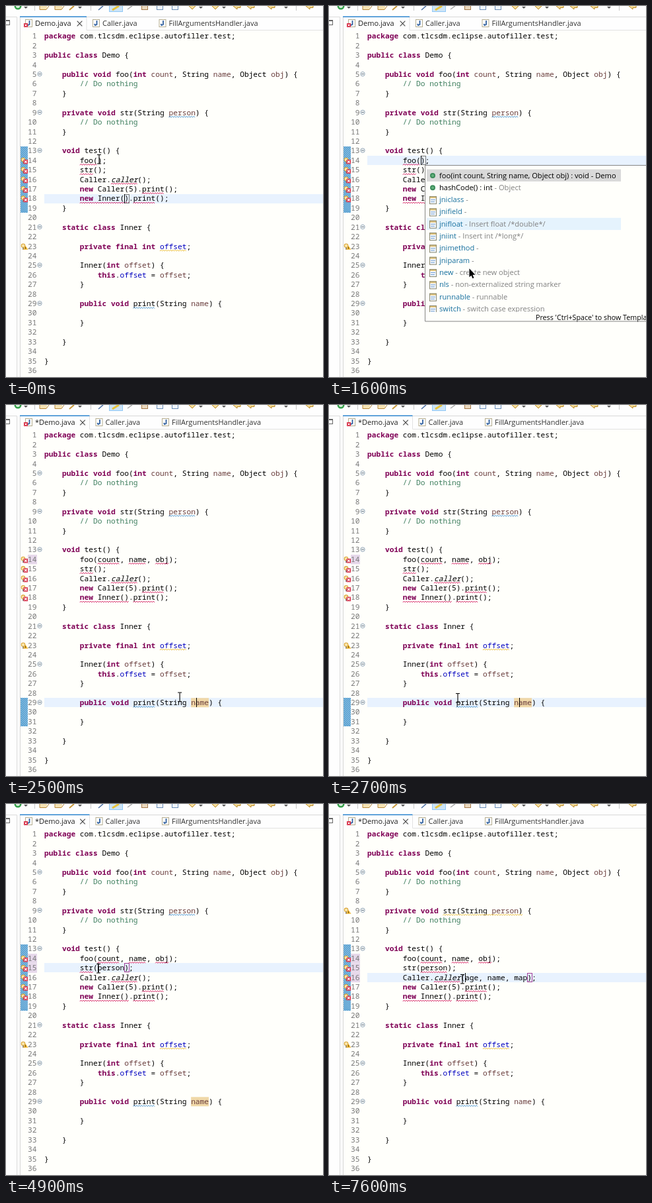
These frames come from a looping animation (480 px wide and 560 px high, 8 s). An HTML page with a canvas:

```html
<!DOCTYPE html>
<html lang="en">
<head>
<meta charset="utf-8">
<title>Argument completion in a Java editor</title>
<style>
html, body { margin: 0; width: 480px; height: 560px; overflow: hidden; background: #fff; }
canvas { display: block; width: 480px; height: 560px; }
</style>
</head>
<body>
<canvas id="stage" width="480" height="560"></canvas>
<script>
const ctx = document.getElementById('stage').getContext('2d');
const LOOP = 8000, STEP = 100;
const MONO = '11.23px "Noto Sans Mono", "DejaVu Sans Mono", monospace';
const UI = '11px "Open Sans", "Noto Sans", sans-serif';
const LIST = '11.1px "Open Sans", "Noto Sans", sans-serif';
const HINT = '10.7px "Open Sans", "Noto Sans", sans-serif';
const PAPER = '#fffffb';
const LEFT = 58, LINE = 14.42, ROW = 18.32;
const RED = '#d4145a', BLUE = '#3f8fd0', YELLOW = '#e8b830';

// Moments when the state of the editor changes.
const AT = {
  clickFoo: 200, open: 900, point: 1200, fillFoo: 2400, clickStr: 3900, fillStr: 4900,
  recheck: 5400, clickCaller: 6300, unmark: 6400, fillCaller: 7600
};

// Pointer path: time, x, y.
const PATH = [
  [0, 141, 231], [1200, 141, 231], [1650, 215, 402], [1900, 215, 402],
  [2000, 215, 419], [2100, 216, 419], [2300, 287, 440], [2400, 287, 440],
  [2700, 195, 442], [2800, 195, 442], [3700, 140, 248], [5600, 140, 248],
  [6100, 206, 264], [6800, 206, 264], [6900, 202, 264], [LOOP, 202, 264]
];

const ROWS = [
  ['foo(int count, String name, Object obj) : void - Demo', ''],
  ['hashCode() : int', ' - Object'],
  ['jniclass', ' - '], ['jnifield', ' - '],
  ['jnifloat', ' - Insert float /*double*/'],
  ['jniint', ' - Insert int /*long*/'],
  ['jnimethod', ' - '], ['jniparam', ' - '],
  ['new', ' - create new object'],
  ['nls', ' - non-externalized string marker'],
  ['runnable', ' - runnable'],
  ['switch', ' - switch case expression'],
  ['switch', ' - switch labeled expression'],
  ['toarray', ' - convert collection to array'],
  ['Fill method arguments: count, name, obj', '']
];

// % marks a parameter, $ a field, ~ a static call.
const codeAt = t => `package com.tlcsdm.eclipse.autofiller.test;

public class Demo {

    public void foo(int %count, String %name, Object %obj) {
        // Do nothing
    }

    private void str(String %person) {
        // Do nothing
    }

    void test() {
        foo(${t >= AT.fillFoo ? 'count, name, obj' : ''});
        str(${t >= AT.fillStr ? 'person' : ''});
        Caller.~caller(${t >= AT.fillCaller ? 'age, name, map' : ''});
        new Caller(5).print();
        new Inner().print();
    }

    static class Inner {

        private final int $offset;

        Inner(int %offset) {
            this.$offset = %offset;
        }

        public void print(String %name) {

        }

    }

}
`.split('\n');

const TOKEN = /(\/\/.*)|([%$~])(\w+)|\b(package|public|private|class|void|int|new|static|final|this)\b|\w+|[^\w\s%$~]+|\s+/g;
const MARK_COLOR = { '%': '#6a3e3e', '$': '#0000c0', '~': '#000' };

ctx.font = MONO;
const CHAR = ctx.measureText('0').width;
const col = n => LEFT + n * CHAR;
const mid = line => 45.5 + (line - 1) * LINE;
const base = line => mid(line) + 3.8;

function box(x, y, w, h, color) {
  ctx.fillStyle = color;
  ctx.fillRect(x, y, w, h);
}

function frame(x, y, w, h, color) {
  ctx.strokeStyle = color;
  ctx.lineWidth = 1;
  ctx.strokeRect(x + .5, y + .5, w - 1, h - 1);
}

function stroke(color, width, ...pts) {
  ctx.strokeStyle = color;
  ctx.lineWidth = width;
  ctx.beginPath();
  pts.forEach(([x, y]) => ctx.lineTo(x, y));
  ctx.stroke();
}

function shape(color, ...pts) {
  ctx.fillStyle = color;
  ctx.beginPath();
  pts.forEach(([x, y]) => ctx.lineTo(x, y));
  ctx.fill();
}

function dot(x, y, r, color) {
  ctx.fillStyle = color;
  ctx.beginPath();
  ctx.arc(x, y, r, 0, 7);
  ctx.fill();
}

function text(s, x, y, font, color, align = 'left') {
  ctx.font = font;
  ctx.fillStyle = color;
  ctx.textAlign = align;
  ctx.fillText(s, x, y);
}

function cross(x, y, r, color, width = 1) {
  stroke(color, width, [x - r, y - r], [x + r, y + r]);
  stroke(color, width, [x + r, y - r], [x - r, y + r]);
}

function pointer(t) {
  const i = Math.max(1, PATH.findIndex(p => p[0] >= t));
  const [t0, x0, y0] = PATH[i - 1], [t1, x1, y1] = PATH[i];
  const k = Math.min(1, Math.max(0, (t - t0) / (t1 - t0)));
  const e = k * k * (3 - 2 * k);
  return [x0 + (x1 - x0) * e, y0 + (y1 - y0) * e];
}

function squiggle(line, from, count, color) {
  const y = base(line) + 2.6, end = col(from + count), pts = [];
  for (let x = col(from), i = 0; x <= end; x += 1.8, i++) pts.push([x, y + (i % 2 ? -.9 : .9)]);
  stroke(color, 1, ...pts);
}

function toolbar() {
  dot(18, 0, 5.5, '#35a04a');
  dot(18, 0, 3, '#d9f0dc');
  shape('#555', [27, 1], [33, 1], [30, 4]);
  stroke('#c8c8c8', 1, [43.5, 0], [43.5, 7]);
  for (const x of [51, 74]) {
    box(x, 0, 11, 5, '#f6e3b4');
    stroke('#b8893c', 1, [x, 0], [x, 5.5], [x + 10, 5.5], [x + 14, 0]);
  }
  stroke('#c99a3c', 2, [96, 6], [103, 0]);
  shape('#555', [109, 1], [115, 1], [112, 4]);
  stroke('#c8c8c8', 1, [128.5, 0], [128.5, 7]);
  stroke('#4a6fa5', 1.5, [140, 6], [147, 0]);
  box(156, 0, 21, 9, '#cce4f7');
  frame(156, -3, 21, 12, '#90c8f6');
  stroke('#e8c33c', 3, [161, 6], [171, 0]);
  stroke('#aaa', 1.5, [184, 5], [191, 0]);
  box(205, 0, 9, 6, '#ead8be');
  frame(205, -3, 10, 9, '#a67b4c');
  for (const x of [228, 251]) {
    box(x, 0, 9, 6, '#f1f6fc');
    frame(x, -3, 10, 9, '#6d8fb8');
  }
  for (const x of [282, 317]) {
    shape('#f6dd9a', [x - 5, 0], [x + 5, 0], [x, 5]);
    stroke('#b88720', 1, [x - 5, 0], [x, 5], [x + 5, 0]);
    shape('#555', [x + 10, 1], [x + 16, 1], [x + 13, 4]);
  }
  for (const x of [350, 371, 402, 460]) {
    shape('#f6dd9a', [x - 6, 0], [x + 5, -3], [x + 5, 2], [x, 2], [x, 5]);
    stroke('#b88720', 1, [x - 6, 0], [x, 5], [x, 2.5], [x + 5, 2.5], [x + 5, 0]);
  }
  shape('#555', [421, 1], [427, 1], [424, 4]);
  stroke('#c8c8c8', 1, [439.5, 0], [439.5, 7]);
}

function fileIcon(x, failed) {
  box(x, 20, 11, 12, '#fff');
  frame(x, 20, 11, 12, '#b5ad90');
  stroke('#2f5f9e', 1.8, [x + 6.5, 22], [x + 6.5, 28], [x + 4, 29], [x + 3, 27]);
  if (failed) {
    box(x - 2, 26, 6, 6, '#d8324a');
    cross(x + 1, 29, 1.5, '#fff');
  }
}

function tabs(dirty) {
  const shift = dirty ? 4.5 : 0, edge = 122 + shift;
  stroke('#dcdcdc', 1, [0, 16.5], [16.5, 16.5], [16.5, 560]);
  stroke('#d8d8d8', 1, [480, 16.5], [21.5, 16.5], [21.5, 560]);
  stroke('#e2e2e2', 1, [edge, 17], [edge, 36.5], [480, 36.5]);
  box(17, 17, 4, 543, '#fafafa');
  box(21, 15.5, edge - 21, 1.5, '#2f86d0');
  frame(-2, 21, 8, 8, '#666');
  box(0, 21, 5, 2, '#666');

  fileIcon(29, true);
  text((dirty ? '*' : '') + 'Demo.java', 44, 30, UI, '#222');
  cross(111.5 + shift, 26.5, 3.8, '#444', 1.1);
  fileIcon(131 + shift, false);
  text('Caller.java', 146 + shift, 30, UI, '#333');
  fileIcon(231.5 + shift, false);
  text('FillArgumentsHandler.java', 246.5 + shift, 30, UI, '#333');
}

function bulb(y) {
  dot(26, y - 1, 3.3, '#d9a53a');
  dot(26, y - 1, 2.2, '#fbe7ac');
  box(25, y + 2, 3, 3, '#8a8a8a');
}

function errorIcon(line) {
  const y = mid(line);
  bulb(y);
  box(26.5, y - 1, 6.5, 6.5, '#d62f48');
  cross(29.8, y + 2.2, 1.8, '#fff', 1.2);
}

function warningIcon(line) {
  const y = mid(line);
  bulb(y);
  shape('#f0b93a', [29.5, y - 1], [33.5, y + 5], [25.5, y + 5]);
  stroke('#6b4a00', 1, [29.5, y + 1], [29.5, y + 4]);
}

function range(first, last) {
  const top = Math.round(mid(first) - 7), bottom = Math.round(mid(last) + 7);
  box(22, top, 11, bottom - top, '#a9d3ee');
  ctx.save();
  ctx.beginPath();
  ctx.rect(22, top, 11, bottom - top);
  ctx.clip();
  for (let y = top - 12; y < bottom; y += 3) stroke('#3b8cc4', 1.2, [22, y], [34, y + 12]);
  ctx.restore();
}

function ruler(t) {
  if (t >= AT.fillFoo && t < AT.clickStr) range(29, 31);
  else range(13, 19);

  const changed = [[14, AT.fillFoo], [15, AT.fillStr], [16, AT.fillCaller]];
  for (const [line, since] of changed)
    if (t >= since) box(33, mid(line) - 7, 14, LINE, '#e6d8ea');

  for (let line = 14; line <= 18; line++) errorIcon(line);
  warningIcon(23);
  if (t >= AT.recheck) warningIcon(9);
  for (let line = 1; line <= 36; line++) text(line, 46.5, base(line), MONO, '#787878', 'right');
  for (const line of [5, 9, 13, 21, 25, 29]) {
    const y = mid(line) - .5;
    ctx.strokeStyle = '#8fa3b5';
    ctx.lineWidth = 1;
    ctx.beginPath();
    ctx.arc(51, y, 3.2, 0, 7);
    ctx.stroke();
    stroke('#55697c', 1, [49, y], [53, y]);
  }
}

function code(t) {
  codeAt(t).forEach((line, i) => {
    let n = 0;
    for (const [all, comment, mark, word, keyword] of line.matchAll(TOKEN)) {
      const s = word || all;
      const style = keyword ? 'bold ' : mark === '~' ? 'italic ' : '';
      const color = comment ? '#3f7f5f' : keyword ? '#7f0055' : mark ? MARK_COLOR[mark] : '#000';
      if (s.trim()) text(s, col(n), base(i + 1), style + MONO, color);
      n += s.length;
    }
  });
}

function problems(t) {
  if (t < AT.fillFoo) squiggle(14, 8, 4, RED);
  else for (const [from, count] of [[12, 5], [19, 4], [25, 3]]) squiggle(14, from, count, RED);
  if (t < AT.recheck) {
    squiggle(15, 8, 3, RED);
    squiggle(9, 28, 6, BLUE);
  } else {
    squiggle(15, 12, 6, RED);
    squiggle(9, 17, 18, YELLOW);
  }
  squiggle(16, 15, 6, RED);
  squiggle(17, 22, 5, RED);
  squiggle(18, 8, 11, RED);
  squiggle(18, 20, 5, RED);
  squiggle(23, 26, 6, YELLOW);
  squiggle(29, 20, 5, BLUE);
}

// Caret line and column, plus the column of the boxed bracket.
function caretAt(t) {
  if (t >= AT.fillCaller) return [16, 22, 36];
  if (t >= AT.clickCaller) return [16, 22, 22];
  if (t >= AT.fillStr) return [15, 12, 18];
  if (t >= AT.clickStr) return [15, 12, 12];
  if (t >= AT.fillFoo) return [29, 34.1, -1];
  if (t >= AT.clickFoo) return [14, 12, 12];
  return [18, 18, 18];
}

function popup(t) {
  const scroll = t >= 1800 ? 4 : t >= 1700 ? 3 : 0;
  const [mx, my] = pointer(t - 150);
  const hover = mx > 146 && my > 247 ? Math.floor((my - 246.3) / ROW) + scroll : -1;
  box(145, 240, 335, 236, PAPER);
  ctx.save();
  ctx.beginPath();
  ctx.rect(146, 246, 334, 216);
  ctx.clip();
  ROWS.forEach(([name, note], i) => {
    const y = 255.5 + (i - scroll) * ROW;
    if (i === 0) box(148, y - 9, 294, ROW, '#d9d9d9');
    else if (i === hover) box(148, y - 9, 294, ROW, '#e5f3fd');
    if (i < 2) {
      dot(157, y + .5, 4, '#3c8c5a');
      dot(157, y + .5, 2, '#65b47f');
    } else if (i < 14) {
      box(152, y - 5, 11, 12, '#f5f8fb');
      box(152, y - 5, 11, 3, '#dfc27a');
      frame(152, y - 5, 11, 12, '#85856f');
      stroke('#6d9bd0', 1, [154, y + .5], [161, y + .5]);
      stroke('#6d9bd0', 1, [154, y + 3.5], [160, y + 3.5]);
    }
    text(name, 167, y + 4, LIST, i > 1 && i < 14 ? '#17709e' : '#000');
    if (note) text(note, 167 + ctx.measureText(name).width, y + 4, LIST, '#808080');
  });
  ctx.restore();
  text("Press 'Ctrl+Space' to show Template Proposals", 313, 473.5, HINT, '#000');
  stroke('#858585', 1, [480, 240.5], [145.5, 240.5], [145.5, 476], [480, 476]);
}

function mouse(x, y, arrow) {
  if (arrow) {
    const pts = [[0, 0], [0, 13], [3, 10.5], [5, 15], [7, 14], [5, 9.7], [9, 9.5]].map(([a, b]) => [x + a, y + b]);
    stroke('#fff', 1.5, ...pts, pts[0]);
    shape('#000', ...pts);
  } else {
    stroke('#111', 1.2, [x, y - 6], [x, y + 7]);
    for (const edge of [y - 6.5, y + 7]) stroke('#111', 1.1, [x - 3, edge], [x + 3, edge]);
  }
}

function draw(t) {
  box(0, 0, 480, 560, '#fefefe');
  box(22, 37, 458, 523, PAPER);
  toolbar();
  tabs(t >= AT.fillFoo);

  const [line, column, bracket] = caretAt(t);
  const top = Math.round(mid(line) - 7);
  box(LEFT, top, 480 - LEFT, 14, '#e8f2fe');
  if (t >= AT.fillFoo && t < AT.unmark) box(col(33), mid(29) - 7, 4 * CHAR, 14, '#f0d8a8');
  ruler(t);
  code(t);
  problems(t);

  if (bracket >= 0) frame(Math.round(col(bracket)), top, 8, 14, bracket > column ? '#a03c96' : '#777');
  box(Math.round(col(column)), top, 1, 14, '#000');

  const open = t >= AT.open && t < AT.fillFoo;
  if (open) popup(t);
  // The pointer stays hidden while the shortcut is typed.
  if (t < AT.open || t >= AT.point) {
    const [x, y] = pointer(t);
    mouse(x, y, open && x > 145 && y > 240);
  }
}

function tick(now) {
  draw(Math.floor(now % LOOP / STEP) * STEP);
  requestAnimationFrame(tick);
}

draw(0);
requestAnimationFrame(tick);
</script>
</body>
</html>
```
